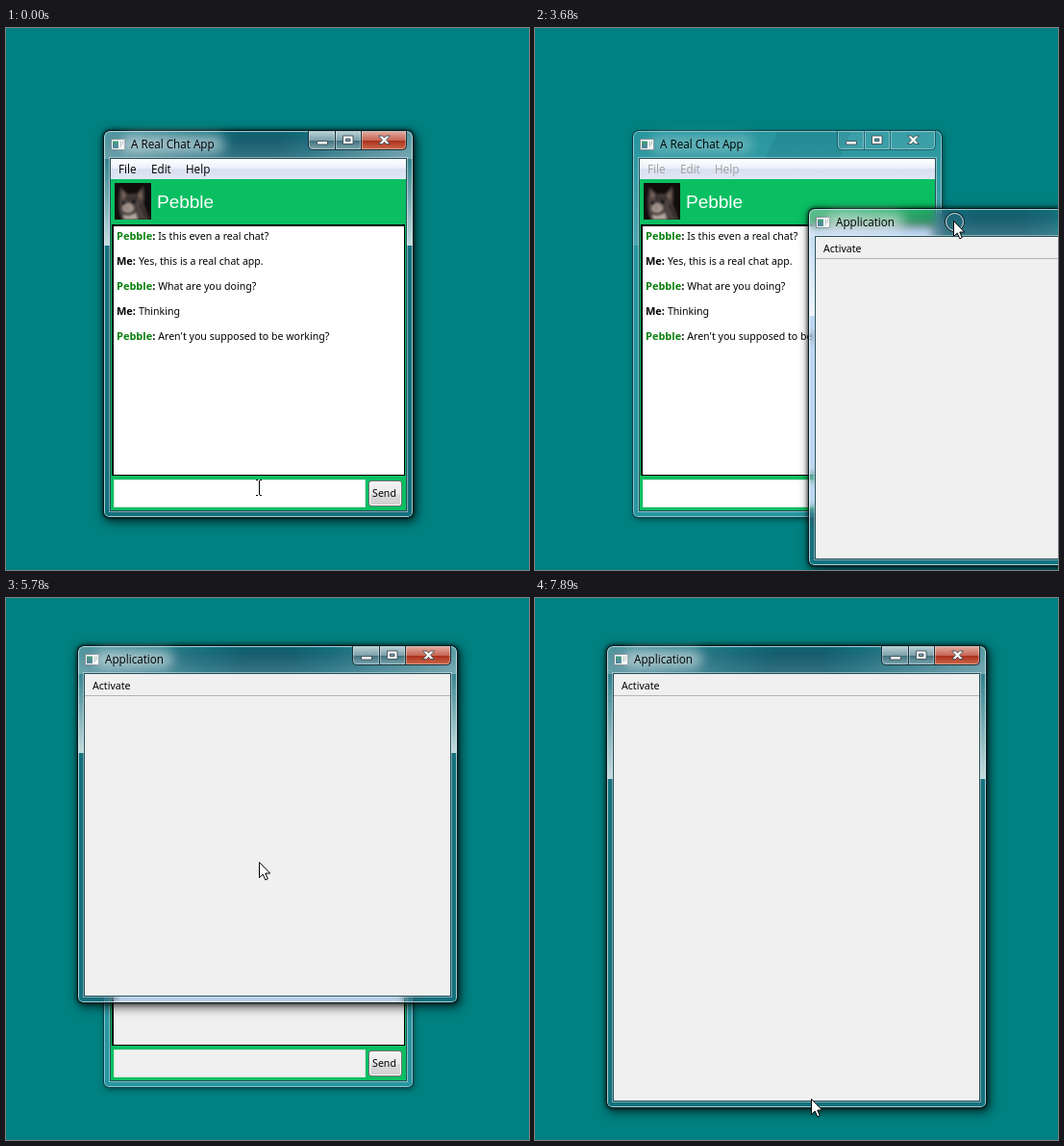
An HTML page that plays this animation: 544 by 563 pixels, repeating every 8000 ms.

```html
<!DOCTYPE html>
<html lang="en">
<head>
<meta charset="utf-8">
<title>Two windows</title>
<style>
html, body { margin: 0; width: 100%; height: 100%; overflow: hidden; background: #008080; }
body, .win * { cursor: default; white-space: nowrap; }
body { position: relative; font: 10.6px "Noto Sans", sans-serif; color: #000; }
svg { position: absolute; overflow: visible; }

.win {
  --close: rgba(255,255,255,.08); --button: rgba(255,255,255,.08); --line: rgba(14,70,80,.65);
  --split: calc(19.6px + 24.7%);
  position: absolute; border-radius: 6px 6px 5px 5px; backdrop-filter: blur(4px);
  background:
    linear-gradient(transparent, rgba(255,255,255,.16) var(--split), transparent 0),
    linear-gradient(115deg, transparent 45%, rgba(0,80,100,.14) 45% 68%, transparent 68%) 0 0 / 100% 29px no-repeat,
    rgba(90,175,195,.45);
  box-shadow: 0 0 0 1px #123f48, inset 0 0 0 1px rgba(190,235,240,.6), 1px 2px 6px rgba(0,0,0,.55);
}
.win.active {
  --close: url(#red); --button: url(#steel); --line: #17333c;
  backdrop-filter: blur(4px) url(#glass);
  background:
    linear-gradient(transparent 8px, rgba(255,255,255,.75) var(--split), transparent 0),
    linear-gradient(100deg, rgba(255,255,255,.28), transparent 34%, rgba(0,40,60,.2) 44% 56%, transparent 66%, rgba(255,255,255,.32)) 0 0 / 100% 29px no-repeat;
  box-shadow: 0 0 0 1px #071a1f, inset 0 0 0 1px rgba(225,245,250,.7),
    0 0 4px 1px rgba(0,0,0,.8), 2px 3px 11px 2px rgba(0,0,0,.65);
}
.title {
  position: absolute; z-index: 0; left: 28px; top: 3px; font: 11.7px/21px "Open Sans", sans-serif;
}
.title::before {
  content: ""; position: absolute; z-index: -1; inset: 1px -10px; border-radius: 10px;
  background: rgba(255,255,255,.5); filter: blur(6px);
}
.win:not(.active) .title::before { opacity: .5; }
.icon { left: 7px; top: 8px; }
.buttons { right: 6px; top: 0; width: 103px; height: 20px; }
.client {
  position: absolute; inset: 29px 7px 7px; background: #f0f0f0;
  box-shadow: 0 0 0 1px #24505a, 0 0 0 2px rgba(255,255,255,.4);
}
.client > * { position: absolute; box-sizing: border-box; }

#chat { left: 102px; top: 107px; width: 321px; height: 401px; }
#chat .client { background: #0abf62; }
#chat .menu {
  left: 0; top: 0; width: 100%; height: 21px; font: 11.7px/21px "Open Sans", sans-serif; color: #a0a0a0;
  background: linear-gradient(#fff, #eef2fa 40%, #d8e0f0 55%, #dfe6f5);
}
#chat.active .menu { color: #000; }
.menu span { position: absolute; }
.photo { left: 4px; top: 25px; width: 38px; height: 38px; overflow: hidden; }
.name { left: 48px; top: 21px; font: 19px/47px "Liberation Sans", Arial, sans-serif; color: #fff; }
.log {
  left: 1px; top: 68px; width: 305px; height: 261px; background: var(--paper);
  border: 2px solid #000; border-width: 2px 1px 1px 2px; padding-left: 3px; line-height: 26px;
}
.log div { position: relative; top: -3px; }
.log b { font-size: 11px; }
.log i { font-style: normal; color: #087f0c; }
.field { left: 3px; top: 333px; width: 262px; height: 29px; background: var(--paper); border: 1px solid #d5e6dc; }
#caret { left: 6px; top: 341px; width: 1px; height: 13px; background: #000; }
.send {
  left: 268px; top: 334px; width: 35px; height: 27px; text-align: center; line-height: 25px;
  border: 1px solid #707070; border-radius: 3px; box-shadow: inset 0 0 0 1px #fafafa;
  background: linear-gradient(#f3f3f3, #ebebeb 50%, #dddddd 50%, #cfcfcf); padding-right: 2px;
}

#app { width: 394px; }
#app .menu { left: 0; top: 0; width: 100%; height: 23px; line-height: 24px; padding-left: 8px; border-bottom: 1px solid #b2b2b2; }
#pointer { left: 0; top: 0; width: 1px; height: 1px; }
</style>
</head>
<body>
<svg width="0" height="0">
  <defs>
    <linearGradient id="red" x2="0" y2="1">
      <stop stop-color="#e3aa9e"/><stop offset=".48" stop-color="#c66654"/>
      <stop offset=".5" stop-color="#ab2f1c"/><stop offset="1" stop-color="#cf6a4c"/>
    </linearGradient>
    <linearGradient id="steel" x2="0" y2="1">
      <stop stop-color="#b9d0d6"/><stop offset=".48" stop-color="#7ca0aa"/>
      <stop offset=".5" stop-color="#3f6f7c"/><stop offset="1" stop-color="#7fa9b2"/>
    </linearGradient>
    <filter id="glass" color-interpolation-filters="sRGB">
      <feColorMatrix values=".58 0 0 0 .11  0 .78 0 0 .03  0 0 .91 0 .03  0 0 0 1 0"/>
    </filter>
    <filter id="soft"><feGaussianBlur stdDeviation=".8"/></filter>
    <g id="buttons">
      <path d="M.5 .5H55.5V19.5H4.5Q.5 19.5 .5 15.5Z" style="fill:var(--button)"/>
      <path d="M55.5 .5H102.5V15.5Q102.5 19.5 98.5 19.5H55.5Z" style="fill:var(--close)"/>
      <path d="M1.5 1V15Q1.5 18.5 5 18.5H27.5V1M29.5 1V18.5H54.5V1M56.5 1V18.5H98Q101.5 18.5 101.5 15V1" fill="none" stroke="#fff" stroke-opacity=".35"/>
      <path d="M.5 0V15.5Q.5 19.5 4.5 19.5H98.5Q102.5 19.5 102.5 15.5V0M28.5 0V19M55.5 0V19" fill="none" style="stroke:var(--line)"/>
      <g fill="#fff" stroke="#3c4d55" stroke-width=".9">
        <path d="M9.5 10.5h11v3.5h-11z"/>
        <path fill-rule="evenodd" d="M36.5 5h10.5v8.5h-10.5zM39.5 8h4.5v2.5h-4.5z"/>
        <path d="M73.5 5h4l2 2.2 2-2.2h4l-4 4.3 4 4.2h-4l-2-2.2-2 2.2h-4l4-4.2z"/>
      </g>
    </g>
    <g id="icon">
      <path d="M.5 .5h14v11h-14z" fill="#f6f8f8" stroke="#7d8d92"/>
      <path d="M2 2.5h6v7.5h-6z" fill="#3f9579"/><path d="M2 6h6v4h-6z" fill="#4b8595"/>
      <path d="M10 2.5h1v6h-1zM12 2.5h1v4h-1z" fill="#a9b5b9"/>
    </g>
  </defs>
</svg>

<div class="win" id="chat">
  <svg class="icon" width="15" height="12"><use href="#icon"/></svg>
  <div class="title">A Real Chat App</div>
  <svg class="buttons"><use href="#buttons"/></svg>
  <div class="client">
    <div class="menu"><span style="left:8px">File</span><span style="left:42px">Edit</span><span style="left:78px">Help</span></div>
    <svg class="photo" viewBox="0 0 38 38">
      <path fill="#120d0d" d="M0 0h38v38H0z"/>
      <g filter="url(#soft)">
        <path fill="#4c4340" d="M7 38Q2 24 6 4l8 8q5-2 8 0l8-9q2 12 0 18l6 17z"/>
        <path fill="#82675f" d="M8 8l4 5-4 4zM28 8l-4 6 4 3z"/>
        <path fill="none" stroke="#2a2321" stroke-width="2" d="M13 13l2 6M18 12v6M23 13l-2 6M27 22l6 14"/>
        <ellipse cx="14" cy="26" rx="6" ry="5" fill="#a1948d"/>
        <path fill="#b5a8a0" d="M9 33q7 3 13-2l2 7H10z"/>
        <circle cx="9.5" cy="21" r="2" fill="#100d0b"/><circle cx="19.5" cy="20" r="2.2" fill="#100d0b"/>
        <path fill="#8b5e58" d="M11 25h4l-2 2.5z"/>
      </g>
    </svg>
    <div class="name">Pebble</div>
    <div class="log">
      <div><b><i>Pebble</i>: </b>Is this even a real chat?</div>
      <div><b>Me: </b>Yes, this is a real chat app.</div>
      <div><b><i>Pebble</i>: </b>What are you doing?</div>
      <div><b>Me: </b>Thinking</div>
      <div><b><i>Pebble</i>: </b>Aren't you supposed to be working?</div>
    </div>
    <div class="field"></div>
    <div id="caret"></div>
    <div class="send">Send</div>
  </div>
</div>

<div class="win active" id="app">
  <svg class="icon" width="15" height="12"><use href="#icon"/></svg>
  <div class="title">Application</div>
  <svg class="buttons"><use href="#buttons"/></svg>
  <div class="client"><div class="menu">Activate</div></div>
</div>

<svg id="pointer">
  <g id="ring" fill="none"><circle r="10" stroke="#101818"/><circle r="9" stroke="#fff" stroke-opacity=".8"/></g>
  <path id="beam" d="M-3 -8.5H-1M1 -8.5H3M-3 7.5H-1M1 7.5H3M.5 -8V7" fill="none" stroke="#000"/>
  <path id="arrow" d="M.5 .5V16.5L4.2 13 6.8 18.8 9.3 17.7 6.8 12H11.7Z" fill="#fff" stroke="#000"/>
  <path id="sizer" d="M0 -11.5L4.5 -6.5H1.5V6.5H4.5L0 11.5 -4.5 6.5H-1.5V-6.5H-4.5Z" fill="#fff" stroke="#000"/>
</svg>

<script>
const LOOP = 8000;
const el = id => document.getElementById(id);
const [chat, app, caret, pointer, ring, beam, arrow, sizer] =
  ['chat', 'app', 'caret', 'pointer', 'ring', 'beam', 'arrow', 'sizer'].map(el);

// Keys are [time, ...values], joined by straight lines and held at both ends.
function track(t, keys) {
  const next = keys.findIndex(k => k[0] > t);
  if (next === 0) return keys[0].slice(1);
  if (next < 0) return keys.at(-1).slice(1);
  const a = keys[next - 1], b = keys[next], p = (t - a[0]) / (b[0] - a[0]);
  return a.slice(1).map((v, i) => Math.round(v + (b[i + 1] - v) * p));
}

const windowPath = [[3060, 530, 274], [3680, 285, 188], [3850, 221, 156], [4130, 142, 124],
  [4660, 83, 64], [4720, 79, 62], [4950, 75, 51], [5130, 75, 50]];
const windowHeight = [[6430, 370], [6800, 412], [7210, 459], [7650, 479]];
const beamPath = [[120, 263, 478], [230, 266, 482]];
const arrowPath = [[3060, 682, 284], [3680, 435, 200], [4130, 293, 133], [4720, 234, 75],
  [4950, 230, 63], [5370, 230, 63], [5700, 257, 235], [6080, 287, 418], [7790, 287, 528], [7890, 287, 520]];

const within = (t, ...spans) => spans.some(([from, to]) => t >= from && t < to);
const show = (node, on) => node.style.visibility = on ? 'visible' : 'hidden';
const move = (node, x, y) => node.setAttribute('transform', `translate(${x} ${y})`);

function draw(t) {
  const [x, y] = track(t, windowPath), [height] = track(t, windowHeight);
  app.style.left = x + 'px';
  app.style.top = y + 'px';
  app.style.height = height + 'px';
  app.style.display = t < 3060 ? 'none' : 'block';

  chat.classList.toggle('active', t < 2110);
  chat.style.setProperty('--paper', within(t, [3850, 6430]) ? '#f0f0f0' : '#fff');
  show(caret, within(t, [600, 1080], [1550, 2110]));

  const typing = t < 970, sizing = within(t, [6080, 7790]);
  const [bx, by] = track(t, beamPath), [ax, ay] = track(t, arrowPath);
  move(beam, bx, by);
  move(arrow, ax, ay);
  move(sizer, 288, y + height - 1);
  if (typing) move(ring, bx, by + .5);
  else if (sizing) move(ring, 288.5, y + height - .5);
  else move(ring, ax + 1.5, ay + 1.5);

  show(beam, typing);
  show(arrow, t >= 3060 && !sizing);
  show(sizer, sizing);
  show(ring, within(t, [550, 600], [3060, 5370], [6130, 7720]));
}

const start = performance.now();
function tick() {
  draw((performance.now() - start) % LOOP);
  requestAnimationFrame(tick);
}
tick();
</script>
</body>
</html>
```
